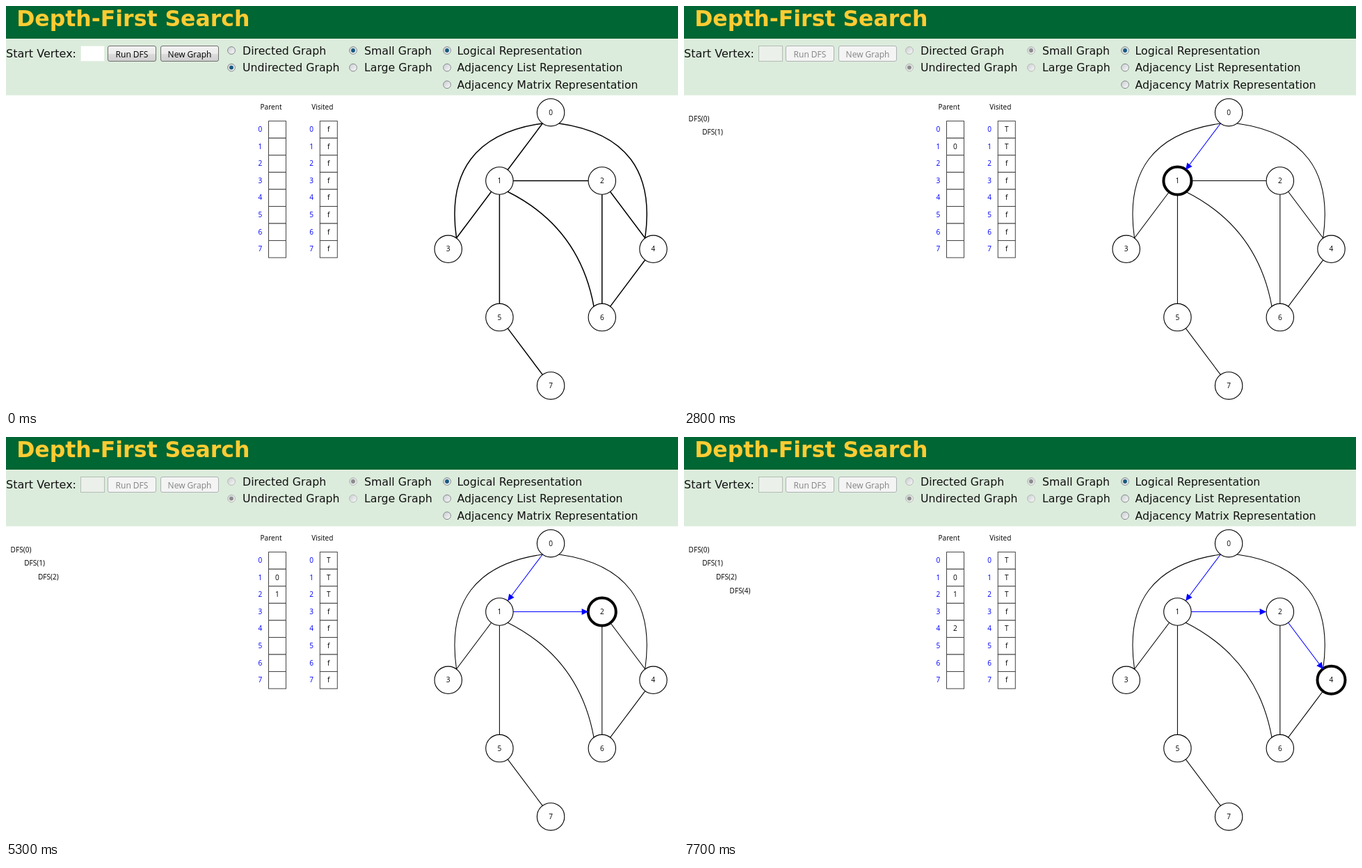
An HTML page for the animation above (8000 ms loop, 966 by 580 pixels).

```html
<!DOCTYPE html>
<html lang="en">
<head>
<meta charset="utf-8">
<title>Depth-First Search</title>
<style>
  html, body { margin: 0; width: 100%; height: 100%; overflow: hidden; background: #fff; }
  svg { display: block; width: 966px; height: 580px; }
  .title { font: bold 31.5px "DejaVu Sans", Verdana, sans-serif; fill: #fc3; }
  .label { font: 15.75px "DejaVu Sans", Verdana, sans-serif; fill: #111; }
  .control { font: 12px "Open Sans", "Noto Sans", sans-serif; fill: #000; }
  .small { font: 10.1px "Open Sans", "Noto Sans", sans-serif; fill: #000; }
  .mid { text-anchor: middle; }
  .index { fill: #00f; }
  .cell { fill: #fff; stroke: #444; }
  .node { fill: #fff; stroke: #000; stroke-width: 1.1; }
  .off { fill: #838383; }
</style>
</head>
<body>
<svg id="stage" viewBox="0 0 966 580" xmlns="http://www.w3.org/2000/svg">
  <defs>
    <linearGradient id="normal" x2="0" y2="1">
      <stop offset="0" stop-color="#f2f2f2"/><stop offset=".5" stop-color="#ebebeb"/>
      <stop offset=".5" stop-color="#ddd"/><stop offset="1" stop-color="#cfcfcf"/>
    </linearGradient>
    <linearGradient id="hover" x2="0" y2="1">
      <stop offset="0" stop-color="#eaf6fd"/><stop offset=".5" stop-color="#d9f0fc"/>
      <stop offset=".5" stop-color="#bee6fd"/><stop offset="1" stop-color="#a7d9f5"/>
    </linearGradient>
    <linearGradient id="pressed" x2="0" y2="1">
      <stop offset="0" stop-color="#e5f4fc"/><stop offset=".5" stop-color="#c4e5f6"/>
      <stop offset=".5" stop-color="#98d1ef"/><stop offset="1" stop-color="#68b3db"/>
    </linearGradient>
    <linearGradient id="radio" x2="1" y2="1">
      <stop offset="0" stop-color="#c8ccd0"/><stop offset="1" stop-color="#fafafa"/>
    </linearGradient>
  </defs>
  <rect width="966" height="47" fill="#063"/>
  <rect y="47" width="966" height="81.5" fill="#dcecdc"/>
  <text class="title" x="15.2" y="29.3">Depth-First Search</text>
  <text class="label" x="0" y="74" style="font-size:16px">Start Vertex:</text>
</svg>
<script>
const LOOP = 8000, STEP = 100, SCALE = 0.983, ROW = 24.57, INDENT = 19.66, R = 19.7;
const stage = document.getElementById('stage');

function add(tag, attrs = {}, text = '') {
  const el = document.createElementNS(stage.namespaceURI, tag);
  set(el, attrs);
  el.textContent = text;
  return stage.appendChild(el);
}
function set(el, attrs) {
  for (const key in attrs) el.setAttribute(key, attrs[key]);
}
const show = (el, on) => el.setAttribute('visibility', on ? 'visible' : 'hidden');
const label = (cls, x, y, text) => add('text', { class: cls, x, y }, text);

// Form controls
const field = add('rect', { x: 107.5, y: 57.5, width: 34, height: 22 });
const typed = label('control', 110, 73.5, '0');
const caret = add('rect', { y: 60, width: 1, height: 17, fill: '#000' });

function button(x, width, text) {
  return {
    box: add('rect', { x, y: 57.5, width, height: 22, rx: 2.5 }),
    caption: label('control mid', x + width / 2, 73.5, text)
  };
}
const styles = {
  normal: ['url(#normal)', '#707070'],
  hover: ['url(#hover)', '#3c7fb1'],
  pressed: ['url(#pressed)', '#2c628b'],
  disabled: ['#f4f4f4', '#adb2b5']
};
function paintButton(b, state) {
  const [fill, stroke] = styles[state];
  set(b.box, { fill, stroke });
  b.caption.setAttribute('class', 'control mid' + (state === 'disabled' ? ' off' : ''));
}
const runButton = button(146.5, 69, 'Run DFS');
const newButton = button(222.5, 83, 'New Graph');

function radio(col, row, text, checked) {
  const x = [324, 499, 634][col], y = 64 + row * 24.6;
  label('label', [340, 515, 648.5][col], y + 5.7, text);
  return {
    locks: col < 2,
    ring: add('circle', { cx: x, cy: y, r: 5.4, fill: 'url(#radio)' }),
    dot: add('circle', { cx: x, cy: y, r: checked ? 2.9 : 0 })
  };
}
const radios = [
  radio(0, 0, 'Directed Graph'), radio(0, 1, 'Undirected Graph', true),
  radio(1, 0, 'Small Graph', true), radio(1, 1, 'Large Graph'),
  radio(2, 0, 'Logical Representation', true),
  radio(2, 1, 'Adjacency List Representation'),
  radio(2, 2, 'Adjacency Matrix Representation')
];

// Tables
function table(title, center) {
  label('small mid', center - 9, 148.6, title);
  return Array.from({ length: 8 }, (_, i) => {
    const y = 165.6 + i * ROW;
    label('small mid index', center - 24.7, y + 15.5, i);
    add('rect', { class: 'cell', x: center - 12.5, y, width: 25, height: ROW });
    return label('small mid', center, y + 15.5, '');
  });
}
const parents = table('Parent', 390);
const visited = table('Visited', 463.8);
const alarm = add('rect', { fill: 'none', stroke: '#f00' });

// Graph
const nodes = [[2, 0], [1, 1], [3, 1], [0, 2], [4, 2], [1, 3], [3, 3], [2, 4]]
  .map(([col, row]) => ({ x: 635.7 + col * 73.7, y: 153.2 + row * 98.3 }));
nodes.forEach((n, i) => {
  add('circle', { class: 'node', cx: n.x, cy: n.y, r: R });
  label('small mid', n.x, n.y + 3.5, i);
});
const ring = add('circle', { r: 20, fill: 'none', stroke: '#000', 'stroke-width': 4 });

function makeEdge([from, to, curve = 0]) {
  const a = nodes[from], b = nodes[to];
  const length = Math.hypot(b.x - a.x, b.y - a.y);
  const ux = (b.x - a.x) / length, uy = (b.y - a.y) / length;
  const x1 = a.x + ux * R, y1 = a.y + uy * R, x2 = b.x - ux * R, y2 = b.y - uy * R;
  const cx = (x1 + x2) / 2 - (y2 - y1) * curve, cy = (y1 + y2) / 2 + (x2 - x1) * curve;
  const d = `M${x1},${y1}Q${cx},${cy} ${x2},${y2}`;
  const bx = x2 - ux * 9.5, by = y2 - uy * 9.5, w = 4.6;
  const tip = `M${x2},${y2}L${bx - uy * w},${by + ux * w}L${bx + uy * w},${by - ux * w}Z`;
  return {
    from, to,
    glow: add('path', { d, fill: 'none', stroke: '#f00' }),
    tipGlow: add('path', { d: tip, fill: '#f00', stroke: '#f00', 'stroke-width': 3 }),
    line: add('path', { d, fill: 'none' }),
    tip: add('path', { d: tip, fill: '#00f' })
  };
}
const edges = [
  [0, 1], [0, 3, 0.5], [0, 4, -0.5], [1, 2], [1, 3], [1, 5], [1, 6, -0.25],
  [2, 4], [2, 6], [4, 6], [5, 7]
].map(makeEdge);

// Search timeline: tree moves, then neighbours found already visited
const START = 1900, LOCK = 1800;
const moves = [
  { from: 0, to: 1, on: 2200, off: 2500, path: [0.08, 0.45, 0.73, 1] },
  { from: 1, to: 2, on: 4000, off: 4300, path: [0.09, 0.46, 0.73, 1] },
  { from: 2, to: 4, on: 5600, off: 6000, path: [0.02, 0.36, 0.73, 1] }
];
const checks = [
  { from: 1, to: 0, on: 3200, off: 3500, depth: 1 },
  { from: 2, to: 1, on: 5000, off: 5300, depth: 2 },
  { from: 4, to: 0, on: 6700, off: 7000, depth: 3 },
  { from: 4, to: 2, on: 7300, off: 7700, depth: 3 }
];
const logLine = (depth, row, text) =>
  label('small', 6.6 + depth * INDENT, 165.8 + row * INDENT, text);
const calls = [{ vertex: 0, at: START }, ...moves.map(m => ({ vertex: m.to, at: m.off + 300 }))];
calls.forEach((c, depth) => c.text = logLine(depth, depth, `DFS(${c.vertex})`));
checks.forEach(c => c.text = logLine(c.depth, c.depth + 1, `Vertex ${c.to} already visited.`));

const within = (t, from, to) => t >= from && t < to;
const joins = (e, s) => (e.from === s.from && e.to === s.to) || (e.from === s.to && e.to === s.from);

function paintForm(t) {
  const locked = t >= LOCK;
  set(field, { fill: locked ? '#ebf0eb' : '#fff', stroke: locked ? '#b4bdb4' : '#e6efe6' });
  show(typed, within(t, 1400, LOCK));
  show(caret, within(t, 500, 800) || within(t, 1200, LOCK));
  set(caret, { x: t < 1400 ? 110 : 117 });
  paintButton(runButton, locked ? 'disabled' : t >= 1700 ? 'pressed' : t >= 1500 ? 'hover' : 'normal');
  paintButton(newButton, locked ? 'disabled' : within(t, 200, 300) ? 'hover' : 'normal');
  radios.forEach(r => {
    const dim = locked && r.locks;
    set(r.ring, { stroke: dim ? '#b5bab5' : '#858a8f' });
    set(r.dot, { fill: dim ? '#8b8b8b' : '#155a80' });
  });
}

function paintSearch(t) {
  const active = [...moves, ...checks].find(s => within(t, s.on, s.off));
  const pulse = active ? 5 + 0.4 * Math.min(2, (t - active.on) / STEP) : 0;

  calls.forEach(c => show(c.text, t >= c.at));
  checks.forEach(c => show(c.text, c === active));
  visited.forEach((cell, i) => {
    cell.textContent = calls.some(c => c.vertex === i && t >= c.at) ? 'T' : 'f';
  });
  parents.forEach((cell, i) => {
    const move = moves.find(m => m.to === i && t >= m.off);
    cell.textContent = move ? move.from : '';
  });

  show(alarm, active);
  if (active) {
    const p = pulse / 2;
    set(alarm, {
      x: 451.3 - p, y: 165.6 + active.to * ROW - p,
      width: 25 + pulse, height: ROW + pulse, 'stroke-width': pulse + 0.5
    });
  }

  edges.forEach(e => {
    const tree = moves.some(m => joins(e, m) && t >= m.off);
    const hot = active && joins(e, active);
    show(e.glow, hot);
    show(e.tipGlow, hot && tree);
    show(e.tip, tree);
    set(e.glow, { 'stroke-width': pulse * 0.85 });
    set(e.line, { stroke: tree ? '#00f' : '#000', 'stroke-width': t < LOCK ? 1.5 : 1.05 });
  });

  const move = moves.filter(m => t >= m.off).pop();
  const a = nodes[move ? move.from : 0], b = nodes[move ? move.to : 0];
  const k = move ? move.path[Math.min(3, (t - move.off) / STEP)] : 0;
  show(ring, t >= START);
  set(ring, { cx: a.x + (b.x - a.x) * k, cy: a.y + (b.y - a.y) * k });
}

function draw(now) {
  const t = Math.floor((now % LOOP) / STEP) * STEP;
  paintForm(t);
  paintSearch(t);
}
let begin;
function tick(now) {
  begin ??= now;
  draw(now - begin);
  requestAnimationFrame(tick);
}
draw(0);
requestAnimationFrame(tick);
</script>
</body>
</html>
```
